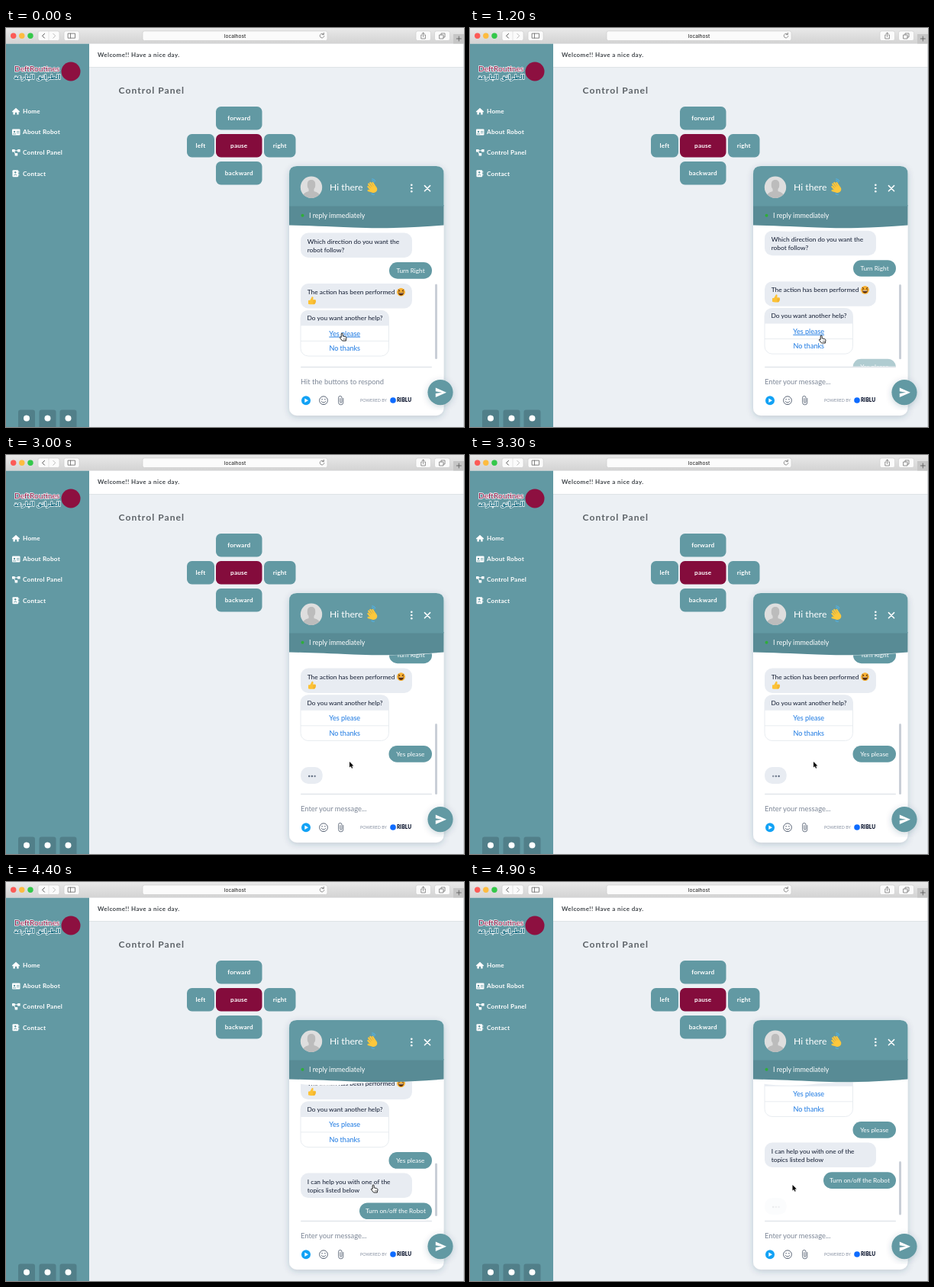
An HTML page for the animation above (5 s loop, 600 by 523 pixels).

```html
<!DOCTYPE html>
<html lang="en">
<head>
<meta charset="utf-8">
<title>Robot control panel</title>
<style>
html, body { margin: 0; width: 100%; height: 100%; overflow: hidden; background: #ecf0f4; }
svg { display: block; width: 100%; height: 100%; }
text { font-family: Lato, "Open Sans", sans-serif; white-space: pre; }
.page { font-weight: 700; letter-spacing: .2px; font-size: 8.2px; fill: #fff; }
.msg { font-size: 8.4px; fill: #101a30; }
.opt { font-size: 9.05px; fill: #1a78e2; text-anchor: middle; }
.pick { font-size: 8.2px; fill: #1a78e2; text-anchor: middle; }
.out { font-size: 8.25px; fill: #fff; text-anchor: middle; }
.mid { text-anchor: middle; }
.hover { text-decoration: underline; }
</style>
</head>
<body>
<svg id="stage" viewBox="0 0 600 523" preserveAspectRatio="none"></svg>
<script>
const TEAL = '#6299a3', DEEP = '#588b95', PALE = '#e8ecf2', BLUE = '#1a78e2', LOOP = 5000;

const box = (x, y, w, h, r, fill, more = '') =>
  `<rect x="${x}" y="${y}" width="${w}" height="${h}" rx="${r}" fill="${fill}" ${more}/>`;
const dot = (x, y, r, fill) => `<circle cx="${x}" cy="${y}" r="${r}" fill="${fill}"/>`;
const line = (d, color, w = 1) =>
  `<path d="${d}" fill="none" stroke="${color}" stroke-width="${w}" stroke-linecap="round" stroke-linejoin="round"/>`;
const shape = (d, fill) => `<path d="${d}" fill="${fill}"/>`;
const text = (x, y, str, cls, more = '') => `<text x="${x}" y="${y}" class="${cls}" ${more}>${str}</text>`;
const group = (id, inner, more = '') => `<g id="${id}" ${more}>${inner}</g>`;

function browser() {
  const ink = '#666';
  const button = (x, w) => box(x, 4, w, 12.5, 2.5, '#fbfbfb', 'stroke="#c9c9c9" stroke-width=".6"');
  return box(0, 0, 600, 20.5, 0, 'url(#bar)') +
    dot(9.7, 10.3, 3.7, '#fc5b57') + dot(20.8, 10.3, 3.7, '#fdbc40') + dot(32, 10.3, 3.7, '#34c84a') +
    button(42, 28) + line('M56 4.5V16', '#d4d4d4', .6) +
    line('M50.5 7.4L47.6 10.3L50.5 13.2', '#555') + line('M61.8 7.4L64.7 10.3L61.8 13.2', '#bbb') +
    button(76, 20) + line('M81.5 7.2H90.5V13.2H81.5ZM84.5 7.2V13.2', ink, .8) +
    button(179, 242) +
    text(300, 12.8, 'localhost', 'mid', 'style="font:500 6.5px Inter,sans-serif" fill="#333"') +
    line('M416 8.2A2.8 2.8 0 1 0 416.8 10.5M416.4 6.3V8.6H414.2', ink, .7) +
    button(537, 19.5) + line('M545 9H543.8V14H549.4V9H548.2M546.6 11.5V6.2M545 7.6L546.6 6L548.2 7.6', ink, .7) +
    button(561.5, 20) + line('M570 9V7H575V12H573M568 9H573V14H568Z', ink, .7) +
    box(586, 8, 14, 12.5, 0, '#c6c6c6') + line('M590.3 14H596.3M593.3 11V17', '#555', .8) +
    box(599.3, 20.5, .7, 503, 0, '#c4c8cc');
}

function sidebar() {
  const social = x => box(x - 11, 500.5, 22, 26, 3, '#517f89') + dot(x, 511.5, 4, '#fff');
  return box(0, 20.5, 109, 503, 0, TEAL) +
    text(11, 57, 'DeftRoutines', '', 'font-size="10.2" fill="#8d1040" stroke="#fff" stroke-width="1.4" paint-order="stroke"') +
    `<text x="41" y="67" class="mid" fill="#146a80" stroke="#fff" stroke-width="1.4" paint-order="stroke"
      style="font:700 8px 'DejaVu Sans',sans-serif">الطرائق البارعة</text>` +
    dot(85, 57, 12.5, '#8d1040') +
    shape('M7.8 109.6L13 104.8L18.2 109.6L17.4 110.4L16.6 109.7V113.6H14.2V110.8H11.8V113.6H9.4V109.7L8.6 110.4Z', '#fff') +
    box(8, 132.5, 10.5, 8, 1, '#fff') + dot(11, 136, 1.2, TEAL) +
    line('M9.3 138.8H12.7M14.3 135.5H17M14.3 137.5H17', TEAL, .8) +
    line('M9.5 160.7H16.8M10 161L13 166', '#fff', .9) +
    box(8, 159, 3.6, 3.6, .6, '#fff') + box(15, 159, 3.6, 3.6, .6, '#fff') + box(11.6, 164, 3.6, 3.6, .6, '#fff') +
    box(8.5, 186.2, 7.6, 9, 1, '#fff') + dot(12.2, 189.3, 1.2, TEAL) +
    line('M10.5 192.8Q12.2 190.8 14 192.8', TEAL, 1) + line('M16.8 188V189.3M16.8 191.5V193', '#fff', .8) +
    ['Home', 'About Robot', 'Control Panel', 'Contact'].map((s, i) => text(22, 112 + i * 27.2, s, 'page')).join('') +
    [27, 54.5, 81.5].map(social).join('');
}

function panel() {
  const key = (x, y, w, label, fill = TEAL) =>
    box(x, y, w, 30.5, 6.5, fill) + text(x + w / 2, y + 17.7, label, 'page mid');
  return box(109, 20.5, 491, 31, 0, '#fff') + box(109, 51, 491, 1, 0, '#dfe3e6') +
    text(120, 37.8, 'Welcome!! Have a nice day.', 'page', 'style="font-size:8px;letter-spacing:.4px;fill:#42474c"') +
    text(147.5, 86, 'Control Panel', 'page', 'style="font-size:12.1px;letter-spacing:1.05px;fill:#5c6267"') +
    key(275, 103, 60.5, 'forward') + key(237, 139, 36, 'left') +
    key(275, 139, 60.5, 'pause', '#840c3c') + key(338, 139, 41.5, 'right') +
    key(275, 175, 60.5, 'backward');
}

const laugh = (x, y) => `<g transform="translate(${x} ${y})">` + dot(0, 0, 5.4, '#f9b233') +
  shape('M-3.5 .5H3.5Q3.2 4.2 0 4.2T-3.5 .5Z', '#5a2d0c') + shape('M-2.8 .7H2.8L2.5 1.4H-2.8Z', '#fff') +
  line('M-3.4 -3L-1.4 -1.8L-3.4 -.8M3.4 -3L1.4 -1.8L3.4 -.8', '#5a2d0c', .9) + '</g>';
const thumb = (x, y) => `<g transform="translate(${x} ${y})">` +
  shape('M-5 -.2L-2.6 -.6L-.2 -5Q1.8 -5.6 1.6 -3.2L1.2 -1.2H4Q5.2 -1 4.9 .4Q5.4 1.4 4.6 2.2Q4.8 3.4 3.9 3.8Q3.8 5 2.4 5H-1.4Q-3 5 -5 4.4Z', '#fcc236') +
  line('M1.8 .8H4.4M1.8 2.4H4.2M1.8 3.8H3.6', '#e09a20', .5) + '</g>';
const wave = '<g transform="translate(480 209) rotate(-34)">' +
  line('M-3.4 1L-4 -4M-1.2 0L-1.5 -6.4M1.2 0V-6.6M3.4 1L3.7 -4.8', '#fdc83c', 2.2) +
  line('M-4 3.6L-6.6 .4', '#fdc83c', 2.4) + box(-4.6, -1.6, 9.2, 9, 4.2, '#fdc83c') +
  line('M-2.3 -1V-3.6M0 -1.2V-4.4M2.3 -1V-3.8', '#e5a52c', .4) +
  line('M-5.6 6.4Q-5 8.4 -3 9M6 -4.4Q6.4 -6.4 4.8 -8M7.8 -4.6Q8 -7.6 6 -9.4', '#4fb3ea', 1) + '</g>';

const said = (y, a, b) => box(386, y, 146, 32.5, 10, PALE) + text(394.7, y + 14, a, 'msg') + text(394.7, y + 25, b, 'msg');
const reply = (id, x, y, str) => group(id, box(x, y, 558 - x, 21.7, 10.8, TEAL) + text((x + 558) / 2, y + 13.7, str, 'out'));
const typing = (id, y) => group(id, box(386, y, 28.7, 22, 10, PALE) +
  [397.2, 400.9, 404.6].map(x => dot(x, y + 12, 1.25, '#5f6c80')).join(''));
const pick = (id, x, y, str) => box(x, y, 556 - x, 19.5, 9.75, '#fff', `stroke="${BLUE}" stroke-width=".8"`) +
  text((x + 556) / 2, y + 12.8, str, 'pick', `id="${id}"`);

function messages() {
  return said(268.5, 'Which direction do you want the', 'robot follow?') +
    reply('right', 502, 307, 'Turn Right') +
    said(335, 'The action has been performed', '') + laugh(517.5, 346.2) + thumb(401, 357.3) +
    box(386, 370.3, 115.5, 59.7, 10, '#fff', 'stroke="#e3e7ed" stroke-width=".8"') +
    shape('M386 390.3V380.3Q386 370.3 396 370.3H491.5Q501.5 370.3 501.5 380.3V390.3Z', PALE) +
    line('M386.5 410.3H501', '#e3e7ed', .8) +
    text(394.5, 383.2, 'Do you want another help?', 'msg') +
    text(443.7, 403.6, 'Yes please', 'opt', 'id="yes"') + text(443.7, 423.3, 'No thanks', 'opt', 'id="no"') +
    reply('sentYes', 501.5, 436.5, 'Yes please') + typing('wait1', 464.5) +
    group('help', said(464, 'I can help you with one of the', 'topics listed below')) +
    group('picks', pick('p1', 471.5, 505, 'Robot Instructions') + pick('p2', 461, 528.5, 'Turn on/off the Robot') +
      pick('p3', 446, 552, 'Contact with an engineer')) +
    reply('sentTurn', 463, 502.8, 'Turn on/off the Robot') + typing('wait2', 531.5);
}

function widget() {
  const grey = '#5d6879';
  return box(371, 181, 202.5, 327, 10, '#fff', 'filter="url(#soft)"') +
    `<g clip-path="url(#list)">${group('feed', messages())}</g>` +
    box(562, 0, 3, 10, 1.5, '#c9cfd7', 'id="thumb"') +
    shape('M371 262C390 267 425 268 450 265S520 263.5 573.5 259V250H371Z', '#fff') +
    shape('M371 258.5C395 259 420 260 455 261.5S530 262 573.5 258.5V232H371Z', DEEP) +
    shape('M371 233.5V191Q371 181 381 181H563.5Q573.5 181 573.5 191V233.5Z', TEAL) +
    dot(400, 208.7, 14.2, '#dedede') +
    '<g clip-path="url(#face)">' + box(394.8, 199, 10.4, 13, 5, '#bcbcbc') +
    shape('M387 224Q388 216 396.5 214V210H403.5V214Q412 216 413 224Z', '#bcbcbc') + '</g>' +
    text(424, 213.2, 'Hi there', '', 'font-size="12.2" fill="#fff"') + wave +
    [205.7, 210, 214.3].map(y => dot(531.3, y, 1.3, '#fff')).join('') +
    line('M548.4 206.6L555.6 213.8M555.6 206.6L548.4 213.8', '#fff', 1.5) +
    dot(388.5, 245.8, 2, '#2fae3a') + text(397, 248.8, 'I reply immediately', '', 'font-size="8.85" fill="#fff"') +
    box(386, 443.8, 172, 1.5, .7, '#e1e5ea') +
    text(386, 466.8, '', '', 'id="hint" font-size="9.35" fill="#7d8797"') +
    dot(393, 488.2, 6, '#12a2f5') + shape('M391.3 485.4L396 488.2L391.3 491Z', '#fff') +
    '<circle cx="416" cy="488.2" r="5.4" fill="none" stroke="#5d6879"/>' +
    dot(414.1, 486.7, .8, grey) + dot(417.9, 486.7, .8, grey) + line('M413.2 489.5Q416 492.8 418.8 489.5', grey, 1) +
    line('M441.8 485.5V490.8A3.1 3.1 0 0 1 435.6 490.8V484.6A2.2 2.2 0 0 1 440 484.6V490.2A1 1 0 0 1 437.8 490.2V485.6', grey, .9) +
    text(464, 490.2, 'POWERED BY', '', 'font-size="5.4" fill="#8791a2"') +
    dot(507, 488, 3.8, '#0d6bff') + text(512, 490.4, 'RIBLU', '', 'font-size="6.6" font-weight="900" fill="#0c1630"') +
    `<g filter="url(#soft)">${dot(569, 477.6, 16.6, TEAL)}</g>` +
    shape('M562.8 471.4L577 477.7L562.8 484L562.8 479.1L571 477.7L562.8 476.3Z', '#fff');
}

const stage = document.getElementById('stage');
stage.innerHTML = `<defs>
  <linearGradient id="bar" x2="0" y2="1"><stop stop-color="#e9e9e9"/><stop offset="1" stop-color="#d3d3d3"/></linearGradient>
  <filter id="soft" x="-20%" y="-20%" width="140%" height="140%">
    <feDropShadow dx="0" dy="2" stdDeviation="4" flood-color="#26405a" flood-opacity=".22"/></filter>
  <clipPath id="list"><rect x="371" y="250" width="202" height="193.8"/></clipPath>
  <clipPath id="face"><circle cx="400" cy="208.7" r="14.2"/></clipPath>
  </defs>` + box(0, 0, 600, 523, 0, '#ecf0f4') + panel() + sidebar() + browser() + widget() +
  group('hand', '<path d="M-1.8 1.1V-3.5a1 1 0 0 1 2 0V-.7l3.4 .8q1.6 .5 1.4 2l-.6 2.2V5.5H-.4L-3.4 1.9q-.6-1.2 .6-1.4z" fill="#fff" stroke="#111" stroke-width=".9" stroke-linejoin="round"/>' +
    line('M1.7 2.5V3.9M3.2 2.5V3.9', '#111', .5)) +
  group('arrow', '<path d="M0 0V7.6L1.8 6L3 8.8L4.2 8.3L3 5.6H5.4Z" fill="#000" stroke="#fff" stroke-width=".6" paint-order="stroke"/>');

// Each row: time, then values eased towards the next row.
const SCROLL = [[0, 0], [1150, 0], [1400, 27.5], [1500, 27.5], [1680, 55.5], [3350, 55.5], [3600, 143],
  [4249, 143], [4250, 65.5], [4520, 94.5], [4650, 94.5], [4850, 122.5]];
const BAR = [[0, 335.5, 98.5], [1150, 335.5, 98.5], [1680, 352, 93], [3350, 352, 93], [3600, 370, 70],
  [4250, 370, 70], [4400, 368.5, 69.5], [4850, 366, 70.5]];
const POINTER = [[0, 441, 404.5], [400, 441, 404.5], [800, 461, 407.5], [1850, 461, 407.5], [2400, 450, 402],
  [3400, 450, 402], [3900, 467, 393.5], [4000, 467, 393.5], [4200, 482, 401.5], [4450, 482, 401.5], [4800, 422.5, 397]];

function at(rows, t) {
  let i = rows.length - 1;
  while (i > 0 && rows[i][0] > t) i--;
  const a = rows[i], b = rows[i + 1] || a;
  const p = b === a ? 0 : (t - a[0]) / (b[0] - a[0]);
  const e = p * p * (3 - 2 * p);
  return a.slice(1).map((v, k) => v + (b[k + 1] - v) * e);
}

const el = id => document.getElementById(id);
const move = (id, x, y) => el(id).setAttribute('transform', `translate(${x} ${y})`);
const within = (t, a, b) => t >= a && t < b;
function fade(id, t, from, to, span, rise = 0) {
  const p = Math.min(1, Math.max(0, (t - from) / span));
  el(id).setAttribute('opacity', within(t, from, to) ? p : 0);
  move(id, 0, rise * (1 - p));
}

function draw(t) {
  move('feed', 0, -at(SCROLL, t)[0]);
  const [y, h] = at(BAR, t);
  el('thumb').setAttribute('y', y);
  el('thumb').setAttribute('height', h);

  fade('sentYes', t, 1150, LOOP, 100);
  fade('wait1', t, 1670, 3350, 200, 4);
  fade('help', t, 3350, LOOP, 100);
  fade('picks', t, 3450, 4250, 200);
  fade('sentTurn', t, 4250, LOOP, 100);
  fade('wait2', t, 4870, LOOP, 200, 6);
  for (const [id, first] of [['wait1', 1670], ['wait2', 4870]]) {
    el(id).querySelectorAll('circle').forEach((c, i) =>
      c.setAttribute('opacity', .8 + .2 * Math.sin((t - first) / 160 - i)));
  }

  el('hint').textContent = t < 1150 || within(t, 3500, 4250) ? 'Hit the buttons to respond' : 'Enter your message...';
  el('yes').classList.toggle('hover', t < 1250);
  el('no').classList.toggle('hover', within(t, 1250, 1950));
  el('p2').classList.toggle('hover', within(t, 3800, 4250));

  const [x, top] = at(POINTER, t);
  const arrow = within(t, 2000, 3700) || t >= 4600;
  move('hand', x, top);
  move('arrow', x, top);
  el('hand').setAttribute('opacity', arrow ? 0 : 1);
  el('arrow').setAttribute('opacity', arrow ? 1 : 0);
}

const start = performance.now();
function tick() {
  const t = (performance.now() - start) % LOOP;
  draw(Math.floor(t / 100) * 100);
  requestAnimationFrame(tick);
}
tick();
</script>
</body>
</html>
```
